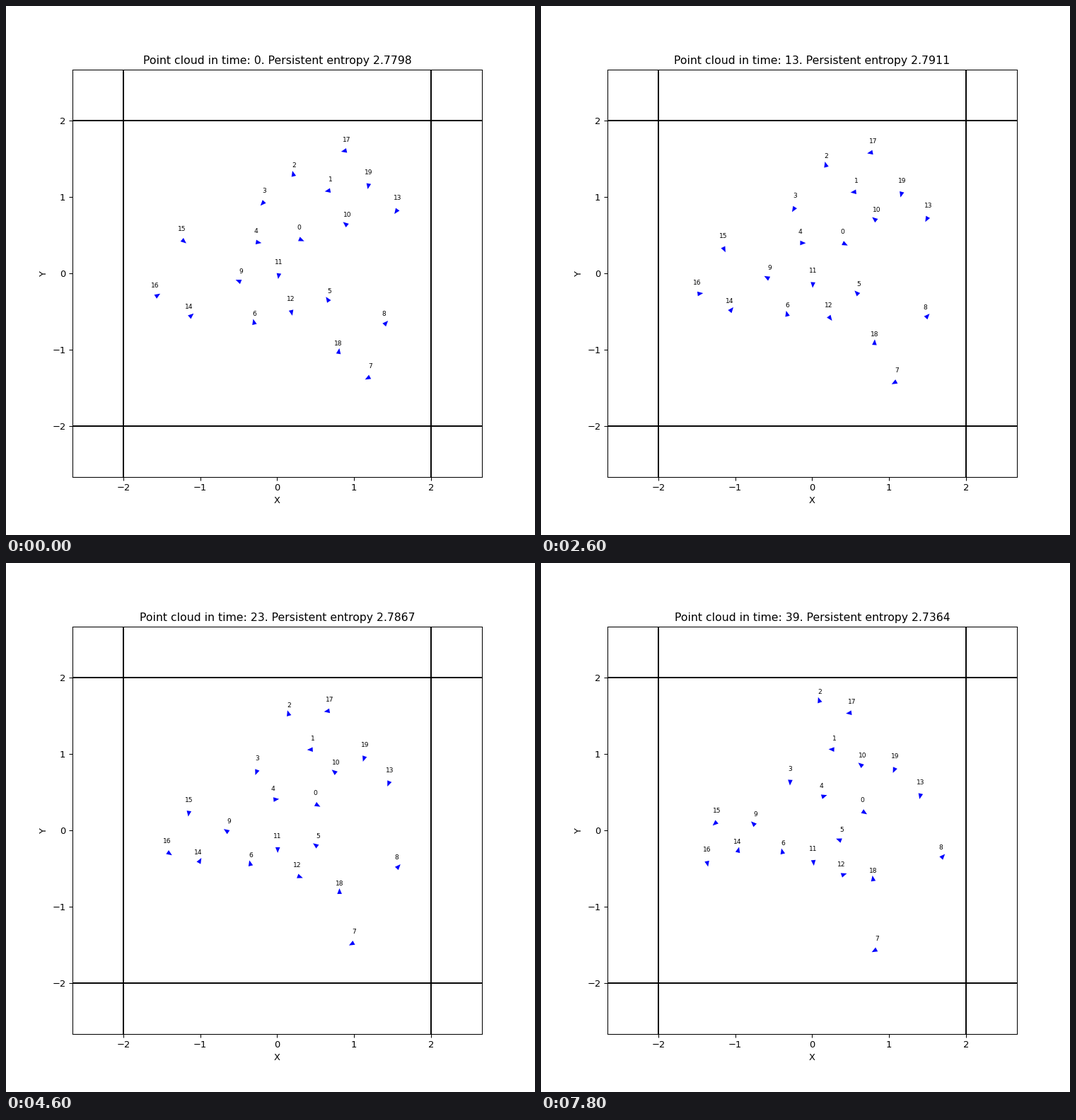
Write a matplotlib script that moves like this. It is 748 by 748 pixels and loops after 8 s.

```python
import numpy as np
import matplotlib.pyplot as plt
from matplotlib.animation import FuncAnimation
from matplotlib.collections import PolyCollection
from matplotlib.transforms import IdentityTransform

SIZE, INCHES = 748, 8
STEPS, STEP_MS = 40, 200
LIMIT = 8 / 3
LABEL_GAP = 16.2

# Each walker: label start, label end (stage pixels, y down), sideways bow.
WALKS = [
    ((414, 313), (454, 334.5), -0.02),
    ((459, 244.5), (415, 247.5), -0.03),
    ((407, 225), (394.5, 181.5), 0.01),
    ((365.5, 260), (352.5, 290), 0.09),
    ((353, 317.5), (396.5, 314.5), 0.06),
    ((457, 402), (425, 376.5), 0.08),
    ((351.5, 434.5), (342, 395.5), 0),
    ((515, 508), (475, 530), 0),
    ((534.5, 435), (565.5, 401.5), 0),
    ((332.5, 374), (303, 355), -0.05),
    ((483, 294.5), (455, 271.5), 0),
    ((386, 361.5), (385, 403.5), 0.03),
    ((403, 413.5), (424.5, 425.5), 0.28),
    ((554, 271), (537, 309.5), 0.05),
    ((259, 424), (278, 393.5), 0.08),
    ((248.5, 314), (249, 349.5), -0.29),
    ((211, 395), (234.5, 405), -0.36),
    ((482, 188), (439.5, 195.5), -0.01),
    ((470, 476), (470, 434), 0.04),
    ((513, 234.5), (501, 273), -0.03),
]

ENTROPY_AT = [0, 6, 13, 19, 23, 29, 39]
ENTROPY = [2.7798, 2.7844, 2.7911, 2.7914, 2.7867, 2.7619, 2.7364]


def progress(t):
    """Share of the way done: a four-step run-up, then steady speed."""
    gone = t * t / 8 if t < 4 else t - 2
    return gone / (STEPS - 3)


def walk(start, end, bow, s):
    """Position and direction on a bowed path, with y pointing up."""
    flip = np.array([1, -1])
    a, b = np.array(start), np.array(end)
    d = b - a
    side = 4 * bow * np.array([-d[1], d[0]])
    pos = a + d * s + side * s * (1 - s)
    ahead = d + side * (1 - 2 * s)
    return pos * flip + [0, SIZE], ahead * flip / np.hypot(*ahead)


def triangle(pos, ahead):
    side = 3.3 * np.array([-ahead[1], ahead[0]])
    base = pos + 0.4 * ahead
    return [base + side, base + 8 * ahead, base - side]


fig, ax = plt.subplots(figsize=(INCHES, INCHES), dpi=SIZE / INCHES)
ax.set(xlim=(-LIMIT, LIMIT), ylim=(-LIMIT, LIMIT), xlabel="X", ylabel="Y",
       xticks=range(-2, 3), yticks=range(-2, 3))
for wall in (-2, 2):
    ax.axhline(wall, color="black")
    ax.axvline(wall, color="black")

pixels = IdentityTransform()
heads = PolyCollection([], facecolors="blue", edgecolors="none",
                       transform=pixels)
ax.add_collection(heads, autolim=False)
labels = [ax.text(0, 0, str(n), fontsize=7, ha="center", va="baseline",
                  transform=pixels) for n in range(len(WALKS))]
title = ax.set_title("")


def draw(t):
    s = progress(t)
    shapes = []
    for label, (start, end, bow) in zip(labels, WALKS):
        pos, ahead = walk(start, end, bow, s)
        label.set_position(pos - [0, 3.5])
        shapes.append(triangle(pos - [0, LABEL_GAP], ahead))
    heads.set_verts(shapes)
    entropy = np.interp(t, ENTROPY_AT, ENTROPY)
    title.set_text(f"Point cloud in time: {t}. "
                   f"Persistent entropy {entropy:.4f}")
    return [heads, title, *labels]


anim = FuncAnimation(fig, draw, frames=STEPS, init_func=lambda: draw(0),
                     interval=STEP_MS, repeat=True, repeat_delay=0)
plt.show()
```
